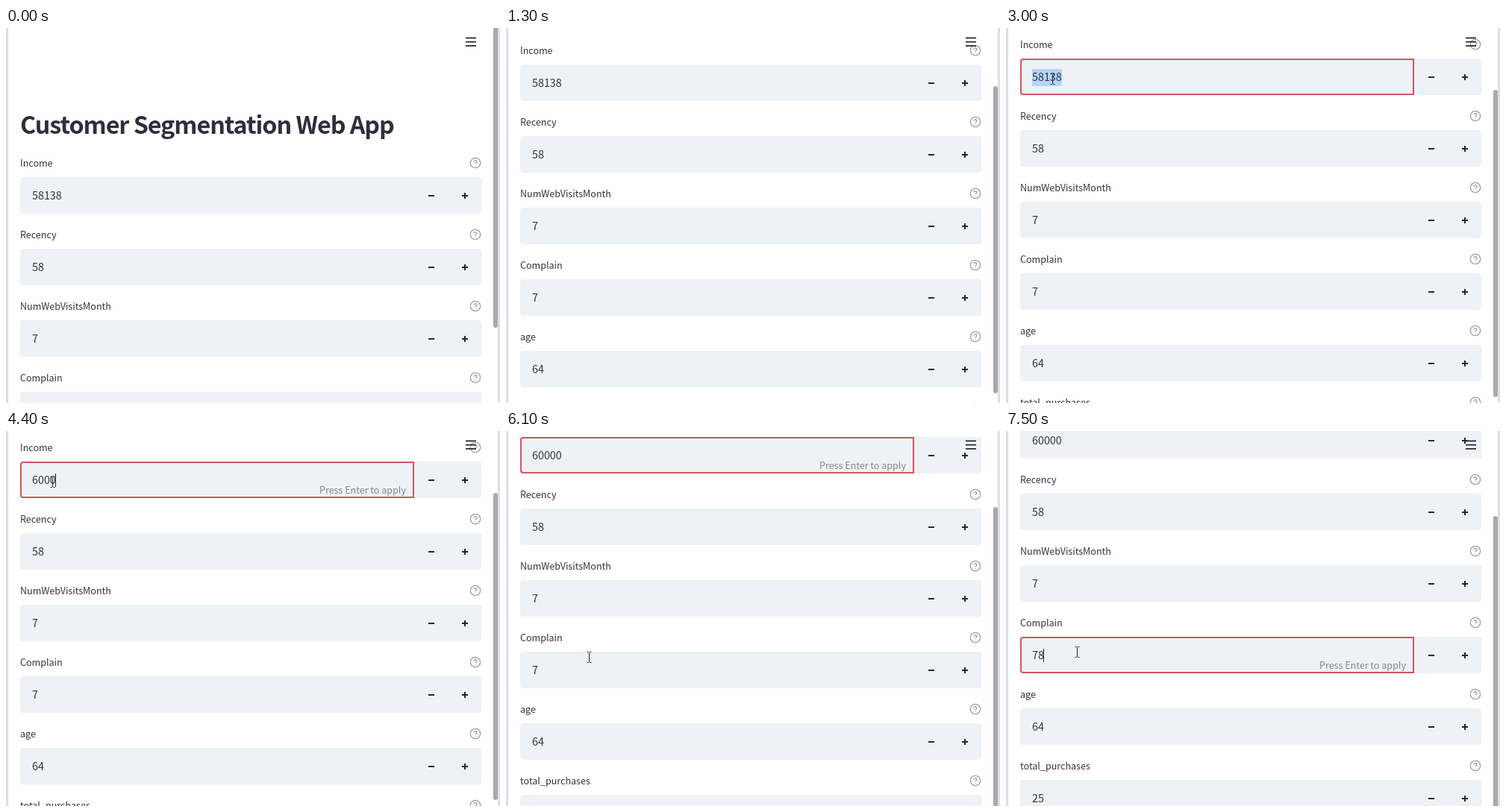
These frames come from a looping animation (662x503 px, 8000 ms). An HTML page:

```html
<!DOCTYPE html>
<html lang="en">
<head>
<meta charset="utf-8">
<title>Customer Segmentation Web App</title>
<style>
html, body { margin: 0; width: 100%; height: 100%; overflow: hidden; background: #fff; }
svg { display: block; }
/* the Latin letters of Noto Sans CJK are a slightly enlarged Source Sans */
text { font: 12.54px "Noto Sans CJK JP", "Noto Sans CJK SC", sans-serif; fill: #31333f; white-space: pre; }
.title { font-size: 32.3px; font-weight: 700; fill: #2b303b; letter-spacing: -.0325em; }
.value { font-size: 14.33px; }
.hint { fill: #83868f; }
.help { fill: none; stroke: #a0a0a4; stroke-width: 2; stroke-linecap: round; }
.sign { stroke: #262730; stroke-width: 2; }
.menu { stroke: #262730; stroke-width: 1.75; }
.focus { fill: none; stroke: #d4555b; stroke-width: 2; }
</style>
</head>
<body>
<svg width="662" height="503" viewBox="0 0 662 503">
  <g id="page"><text class="title" x="19" y="142">Customer Segmentation Web App</text></g>
  <path class="menu" d="M616 13.4h14M616 18.6h14M616 23.8h14"/>
  <path d="M0 0h3v503h-3zM659 0h3v503h-3z" fill="#dddde3"/>
  <rect id="thumb" x="653" width="6" height="412" rx="3" fill="#a9a8ad"/>
  <path id="beam" d="M-3 -7h2l1 1l1 -1h2M0 -6v12M-3 7h2l1 -1l1 1h2" fill="none" stroke="#222"/>
  <path id="arrow" d="M.5 .5v15l3.6 -3.2l2.6 5.6l2.6 -1.2l-2.6 -5.4h4.8z" fill="#222" stroke="#fff"/>
</svg>
<script>
const LOOP = 8000, FRAME = 100, ROW = 96, NOTCH = 53, DIGIT = 7.95;
const $ = id => document.getElementById(id);

const form = { Income: 58138, Recency: 58, NumWebVisitsMonth: 7, Complain: 7, age: 64, total_purchases: 25 };
$('page').innerHTML += Object.entries(form).map(([name, value], i) => `
  <g id="${name}" transform="translate(0 ${ROW * i})">
    <text x="19" y="186">${name}</text>
    <g class="help" transform="translate(621 173) scale(.6667)">
      <circle cx="12" cy="12" r="10"/>
      <path d="M9.1 9a3 3 0 0 1 5.8 1c0 2 -3 3 -3 3M12 17v.01"/>
    </g>
    <rect x="19" y="200" width="618" height="49" rx="4" fill="#eef1f6"/>
    <path class="sign" d="M566 225h8M611 225h8M615 221v8"/>
    <rect class="select" x="35" y="214" width="40" height="23" fill="#b4d5fe" visibility="hidden"/>
    <text class="value" x="35" y="230">${value}</text>
    <rect class="caret" y="216" width="1" height="18" fill="#262730" visibility="hidden"/>
    <path class="focus" d="M546 201v47H23a3 3 0 0 1 -3 -3v-41a3 3 0 0 1 3 -3z" opacity="0"/>
    <text class="hint" x="420" y="243" visibility="hidden">Press Enter to apply</text>
  </g>`).join('');

const within = (t, a, b) => t >= a && t < b;
const clamp = p => Math.max(0, Math.min(1, p));
const ease = p => p < .5 ? 4 * p ** 3 : 1 - 4 * (1 - p) ** 3;
const fade = (t, start) => clamp((t - start + FRAME) / 300);
const show = (el, on) => el.setAttribute('visibility', on ? 'visible' : 'hidden');

// each wheel notch: [start, end]
const notches = [[600, 800], [900, 1000], [1100, 1400], [5860, 6300]];
const scrollAt = t => Math.round(notches.reduce((y, [a, b]) => y + NOTCH * ease(clamp((t - a) / (b - a))), 0));

// each pointer move: [start, end, x, y]
const moves = [[1400, 1900, 267, 52], [2000, 2400, 48, 64], [2400, 2600, 62, 68],
  [5600, 5700, 107, 237], [5800, 6000, 126, 309], [6000, 6200, 95, 296]];
function pointerAt(t) {
  return moves.reduce(([x, y], [a, b, toX, toY]) => {
    const p = clamp((t - a) / (b - a));
    return [x + (toX - x) * p, y + (toY - y) * p];
  }, [470, 110]).map(Math.round);
}

// the pause before each further key grows by one frame
function typed(t) {
  const count = Math.floor((1 + Math.sqrt(1 + (t - 3800) / 12.5)) / 2);
  return '60000'.slice(0, count);
}

function setField(name, { value, focus, caret, hint, select }) {
  const part = cls => $(name).querySelector('.' + cls);
  part('value').textContent = value;
  part('focus').setAttribute('opacity', focus);
  part('caret').setAttribute('x', Math.round(34.5 + String(value).length * DIGIT));
  show(part('caret'), caret);
  show(part('hint'), hint);
  show(part('select'), select);
}

function draw(t) {
  const y = scrollAt(t);
  $('page').setAttribute('transform', `translate(0 ${-y})`);
  $('thumb').setAttribute('y', Math.round(y * .585 - 10));

  const [mx, my] = pointerAt(t);
  const inField = my + y > 200 && (my + y - 200) % ROW < 49 && mx < 547;
  $('beam').setAttribute('transform', `translate(${mx + .5} ${my + .5})`);
  $('arrow').setAttribute('transform', `translate(${mx} ${my})`);
  show($('beam'), t >= 1500 && inField);
  show($('arrow'), t >= 1500 && !inField);

  setField('Income', {
    value: t < 3800 ? form.Income : typed(t),
    focus: fade(t, 2800) - fade(t, 6600),
    caret: within(t, 3800, 5400),
    hint: within(t, 3800, 6600),
    select: within(t, 2800, 3800)
  });
  setField('Complain', {
    value: t < 7500 ? form.Complain : 78,
    focus: fade(t, 6600),
    caret: within(t, 6600, 7100) || t >= 7500,
    hint: t >= 7500
  });
}

function tick(now) {
  draw(Math.floor(now % LOOP / FRAME) * FRAME);
  requestAnimationFrame(tick);
}
draw(0);
requestAnimationFrame(tick);
</script>
</body>
</html>
```
